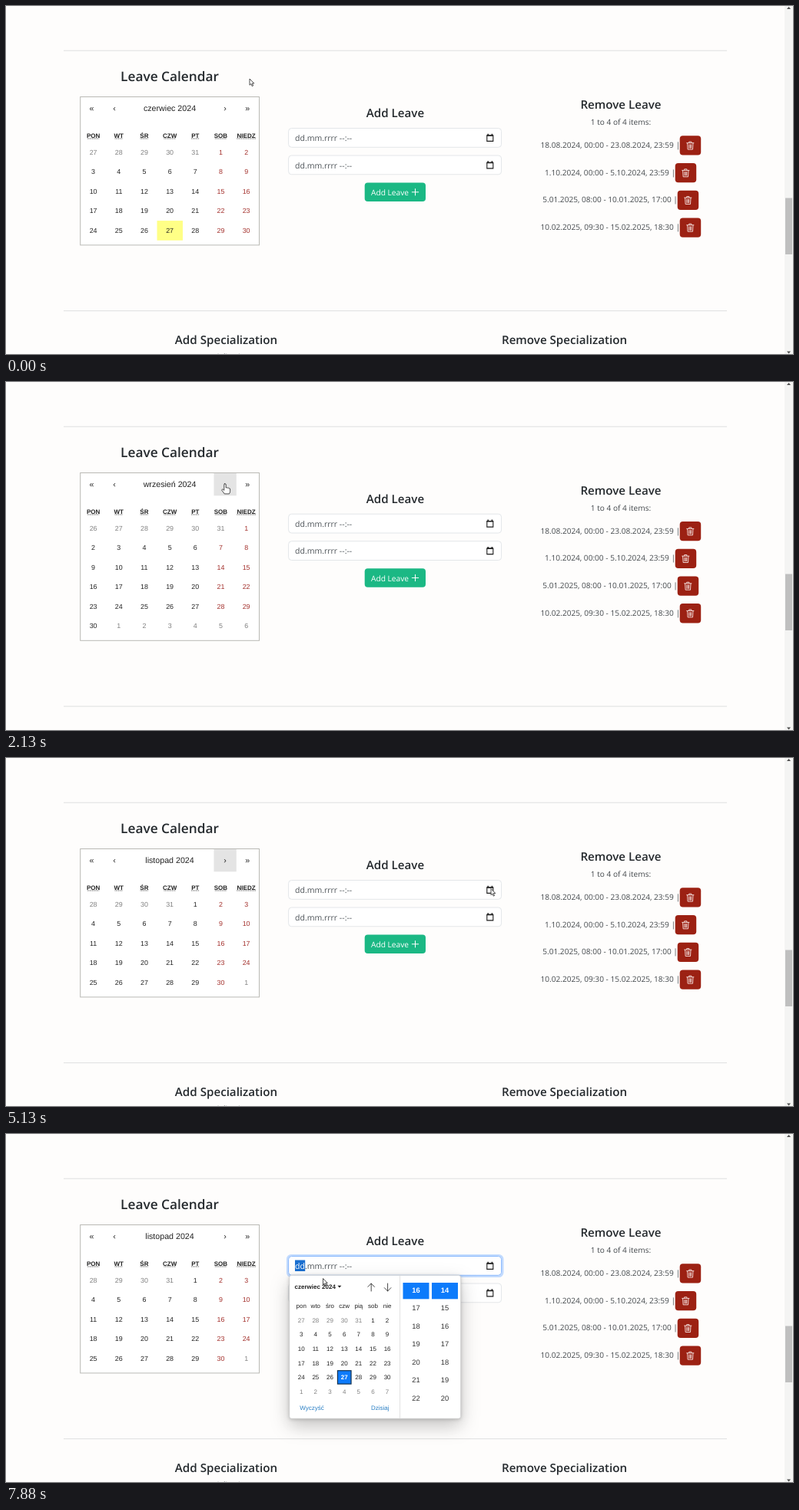
These frames come from a looping animation (1024x454 px, 8000 ms). An HTML page:

```html
<!DOCTYPE html>
<html lang="pl">
<head>
<meta charset="utf-8">
<title>Leave Calendar</title>
<style>
html, body { margin: 0; width: 100%; height: 100%; overflow: hidden; background: #fefdfc; }
svg { display: block; width: 1024px; height: 454px; text-rendering: geometricPrecision; }
text { font-family: "Open Sans", "Noto Sans", sans-serif; font-size: 10.1px; fill: #43484c; white-space: pre; }
.mid { text-anchor: middle; }
.head { font-size: 15.15px; font-weight: 600; fill: #24292d; }
.big { font-size: 17.25px; }
.field { font-size: 10.5px; fill: #4d5358; }
.arial { font-family: "Liberation Sans", Arial, sans-serif; font-size: 8.9px; fill: #222; }
.nav { font-size: 10.67px; }
.wday { font-size: 8px; font-weight: 700; }
.small { font-size: 8px; }
.time { font-size: 9.4px; fill: #333; }
.bold { font-weight: 700; }
.grey { fill: #808080; }
.red { fill: #a3302c; }
.white { fill: #fff; }
.link { fill: #2a7fc4; }
.line { fill: none; stroke-linecap: round; stroke-linejoin: round; }
#picker-box { filter: drop-shadow(0 9px 12px rgba(0, 0, 0, .2)) drop-shadow(0 1px 2px rgba(0, 0, 0, .2)); }
</style>
</head>
<body>
<svg id="stage" viewBox="0 0 1024 454" xmlns="http://www.w3.org/2000/svg">
  <defs><clipPath id="times-clip"><path d="M514 194h76v164h-76z"/></clipPath></defs>
  <rect width="1024" height="454" fill="#fefdfc"/>
  <path d="M75 58.2h863" stroke="#dedfdf"/>
  <text class="mid head big" x="213" y="98">Leave Calendar</text>
  <g id="calendar"></g>
  <g id="columns">
    <text class="mid head" x="506.5" y="145">Add Leave</text>
    <g id="fields"></g>
    <rect x="466.7" y="230.5" width="79.3" height="24.6" rx="4" fill="#1bb884"/>
    <text class="white" x="475" y="247.3" style="font-size:10.2px">Add Leave</text>
    <path d="M528.3 242.8h8.4m-4.2-4.2v8.4" class="line" stroke="#fff"/>
    <text class="mid head" x="800" y="134.3">Remove Leave</text>
    <text class="mid" x="800" y="155">1 to 4 of 4 items:</text>
    <g id="leaves"></g>
  </g>
  <g id="below">
    <path d="M75 397.7h863" stroke="#dedfdf"/>
    <text class="mid head" x="286.5" y="440.6">Add Specialization</text>
    <text class="mid head" x="726.5" y="440.6">Remove Specialization</text>
    <text class="mid" x="285" y="460.5">specialization</text>
  </g>
  <rect x="1013" width="11" height="454" fill="#f4f4f3"/>
  <rect x="1014" y="250.5" width="9" height="73.5" fill="#bfbfbf"/>
  <path d="M1016 4l2.5-3 2.5 3zM1016 450.5l2.5 3 2.5-3z" fill="#505050"/>
  <g id="picker"></g>
  <path id="cursor" fill="#fff" stroke="#222" stroke-width=".8" stroke-linejoin="round"/>
</svg>
<script>
const LOOP = 8000, TICK = 125;
const $ = id => document.getElementById(id);
const text = (x, y, str, cls) => `<text x="${x}" y="${y}" class="${cls}">${str}</text>`;
const rect = (x, y, w, h, attrs) => `<rect x="${x}" y="${y}" width="${w}" height="${h}" ${attrs}/>`;

const MONTHS = { 5: 'czerwiec', 6: 'lipiec', 7: 'sierpień', 8: 'wrzesień', 9: 'październik', 10: 'listopad' };
const CLICKS = [8, 11, 16, 19, 24];
const OPEN = 48, HOVER = 4, LEAVE = 29;
// Pointer moves: first tick, last tick, x, y
const MOVES = [
  [0, 0, 317, 95], [1, 4, 285, 133], [29, 29, 443.7, 201], [30, 35, 545, 186],
  [36, 41, 631, 170.5], [52, 54, 527, 188], [56, 58, 456, 195], [63, 63, 412.5, 188.5]
];
const ARROW = 'M0 0V8.2L1.9 6.5 3.2 9.6 4.6 9 3.3 6H5.8Z';
const HAND = 'M-1.2 1a1.2 1.2 0 0 1 2.4 0V5q1.2-.6 2 .2 1.2-.5 1.9.4 1.5-.2 1.5 1.4V9.5q0 1.8-1.2 3.4H-.8Q-2 11-4 8.6q-.5-1.4.6-1.6 1 0 2.2 1.3z';

// Whole weeks, Monday first, covering one month of 2024
function monthDays(month, weeks) {
  const lead = (new Date(2024, month, 1).getDay() + 6) % 7;
  const length = new Date(2024, month + 1, 0).getDate();
  const count = 7 * (weeks || Math.ceil((lead + length) / 7));
  return Array.from({ length: count }, (_, i) => {
    const date = new Date(2024, month, i - lead + 1);
    return { day: date.getDate(), col: i % 7, row: Math.floor(i / 7), inside: date.getMonth() === month };
  });
}

function tileFill(month, { day, inside }) {
  if (!inside) return '';
  if (month === 5 && day === 27) return '#ffff86';
  const onLeave = month === 7 && day >= 18 && day <= 23 || month === 9 && day <= 5;
  return onLeave ? '#b5f9cb' : '';
}

function drawCalendar(month, hover) {
  const left = 97, colW = 33.17, top = 178.5, rowH = 25.4;
  const days = monthDays(month), grow = (days.length / 7 - 5) * rowH;
  let out = rect(96.7, 118.5, 232.8, 193.4 + grow, 'fill="#fff" stroke="#b9b9b4"');
  if (hover) out += rect(270.5, 119, 29.3, 29.3, 'fill="#e4e4e4"');
  [['«', 111.5], ['‹', 141], [MONTHS[month] + ' 2024', 213], ['›', 285], ['»', 314.3]]
    .forEach(([str, x]) => out += text(x, 137, str, 'mid arial nav'));
  ['PON', 'WT', 'ŚR', 'CZW', 'PT', 'SOB', 'NIEDZ'].forEach((name, i) => {
    const x = left + colW * (i + .5), half = name.length * 2.4 + .5;
    out += text(x, 171.5, name, 'mid arial wday');
    out += `<path d="M${x - half} 173h${2 * half}" stroke="#333" stroke-width=".7" stroke-dasharray="1 .5"/>`;
  });
  let tiles = '', labels = '';
  for (const d of days) {
    const x = left + colW * d.col, y = top + rowH * d.row, fill = tileFill(month, d);
    if (fill) tiles += rect(x, y, colW + .3, rowH + .3, `fill="${fill}"`);
    const tone = !d.inside ? 'grey' : d.col > 4 ? 'red' : '';
    labels += text(x + colW / 2, y + 15.5, d.day, 'mid arial ' + tone);
  }
  $('calendar').innerHTML = out + tiles + labels;
  $('columns').setAttribute('transform', `translate(0 ${grow / 2})`);
  $('below').setAttribute('transform', `translate(0 ${grow})`);
}

function drawFields(focus) {
  $('fields').innerHTML = [159.5, 195].map((y, i) => {
    const on = focus && i === 0;
    return (on ? rect(366.2, y - 1.3, 280, 27.6, 'rx="5" fill="none" stroke="#c3dbfe" stroke-width="2.6"') : '') +
      rect(367.6, y, 277, 24.8, `rx="4" fill="#fff" stroke="${on ? '#86b7fe' : '#e3e6e9'}"`) +
      (on ? rect(376, y + 5, 13.2, 14.5, 'fill="#1a6fd0"') : '') +
      `<text class="field" x="376" y="${y + 16.6}"><tspan${on ? ' fill="#fff"' : ''}>dd</tspan>.mm.rrrr --:--</text>` +
      `<path d="M625.8 ${y + 9.3}h8v7.6h-8z" fill="none" stroke="#1c1c1c" stroke-width="1.1"/>` +
      `<path d="M625.8 ${y + 9.6}h8m-6.6-2.3v2m5.2-2v2" stroke="#1c1c1c" stroke-width="1.5"/>`;
  }).join('');
}

function drawLeaves() {
  const rows = [
    [695.5, 876.7, '18.08.2024, 00:00 - 23.08.2024, 23:59 |'],
    [701, 870.7, '1.10.2024, 00:00 - 5.10.2024, 23:59 |'],
    [698.2, 873.7, '5.01.2025, 08:00 - 10.01.2025, 17:00 |'],
    [695.5, 876.7, '10.02.2025, 09:30 - 15.02.2025, 18:30 |']
  ];
  $('leaves').innerHTML = rows.map(([x, button, str], i) => {
    const y = 169.3 + 35.7 * i;
    return text(x, y + 15.7, str, '') + rect(button, y, 27.5, 25.3, 'rx="4" fill="#9c2113"') +
      `<path transform="translate(${button + 13.6} ${y + 12.8})" class="line" stroke="#f6e4e1" stroke-width=".9"
        d="M-4.6-3.4H4.6M-1.6-3.6V-5H1.6V-3.6M-3.7-3.2-3.2 5H3.2L3.7-3.2M-1.5-1.3-1.4 3.2M0-1.3V3.2M1.5-1.3 1.4 3.2"/>`;
  }).join('');
}

function drawPicker() {
  const colX = i => 384.2 + 18.65 * i;
  let out = rect(368.7, 184.3, 223, 187, 'id="picker-box" rx="3" fill="#fff" stroke="#c9c9c9" stroke-width=".7"');
  out += '<path d="M512.6 185v186" stroke="#e2e2e2"/>';
  out += text(375.5, 202, 'czerwiec 2024', 'arial small bold');
  out += '<path d="M431.4 197.7h5l-2.5 2.8z" fill="#222"/>';
  out += '<path class="line" stroke="#333" stroke-width=".9" d="M475.2 205v-10m-4.3 4.4 4.3-4.4 4.3 4.4M496.6 195v10m-4.3-4.4 4.3 4.4 4.3-4.4"/>';
  ['pon', 'wto', 'śro', 'czw', 'pią', 'sob', 'nie'].forEach((name, i) => out += text(colX(i), 226.8, name, 'mid arial small'));
  for (const d of monthDays(5, 6)) {
    const x = colX(d.col), y = 243 + 18.65 * d.row, today = d.inside && d.day === 27;
    if (today) out += rect(x - 8.7, y - 8.9, 17.6, 17.4, 'fill="#0d7bfb" stroke="#14324f" stroke-width="1.2"');
    out += text(x, y + 2.8, d.day, 'mid arial small ' + (today ? 'bold white' : d.inside ? '' : 'grey'));
  }
  out += text(382.3, 359.7, 'Wyczyść', 'arial small link') + text(475, 359.7, 'Dzisiaj', 'arial small link');
  let lists = '';
  [[533.5, 16], [571, 14]].forEach(([x, first]) => {
    lists += rect(x - 17, 193.8, 34, 23.2, 'fill="#0d7bfb"');
    for (let i = 0; i < 7; i++) lists += text(x, 208.7 + 23.5 * i, first + i, 'mid arial time ' + (i ? '' : 'bold white'));
  });
  $('picker').innerHTML = out + `<g clip-path="url(#times-clip)"><g id="times">${lists}</g></g>`;
}

function pointerAt(tick) {
  let [, , x, y] = MOVES[0];
  for (const [from, to, tx, ty] of MOVES) {
    if (tick < from) break;
    const p = Math.min(1, (tick - from + 1) / (to - from + 1));
    x += (tx - x) * p;
    y += (ty - y) * p;
  }
  return [x, y];
}

function draw(tick) {
  const open = tick >= OPEN;
  drawCalendar(5 + CLICKS.filter(c => tick >= c).length, tick >= HOVER && !open);
  drawFields(open);
  $('picker').setAttribute('visibility', open ? 'visible' : 'hidden');
  const scroll = Math.max(0, Math.min(1, (tick - 51) / 3)) * 1.7;
  $('times').setAttribute('transform', `translate(0 ${-scroll})`);
  $('cursor').setAttribute('d', tick >= HOVER && tick < LEAVE ? HAND : ARROW);
  $('cursor').setAttribute('transform', `translate(${pointerAt(tick)})`);
}

let shown = -1;
function frame() {
  const tick = Math.floor((performance.now() % LOOP + 5) / TICK) % (LOOP / TICK);
  if (tick !== shown) draw(shown = tick);
  requestAnimationFrame(frame);
}
drawLeaves();
drawPicker();
frame();
</script>
</body>
</html>
```
